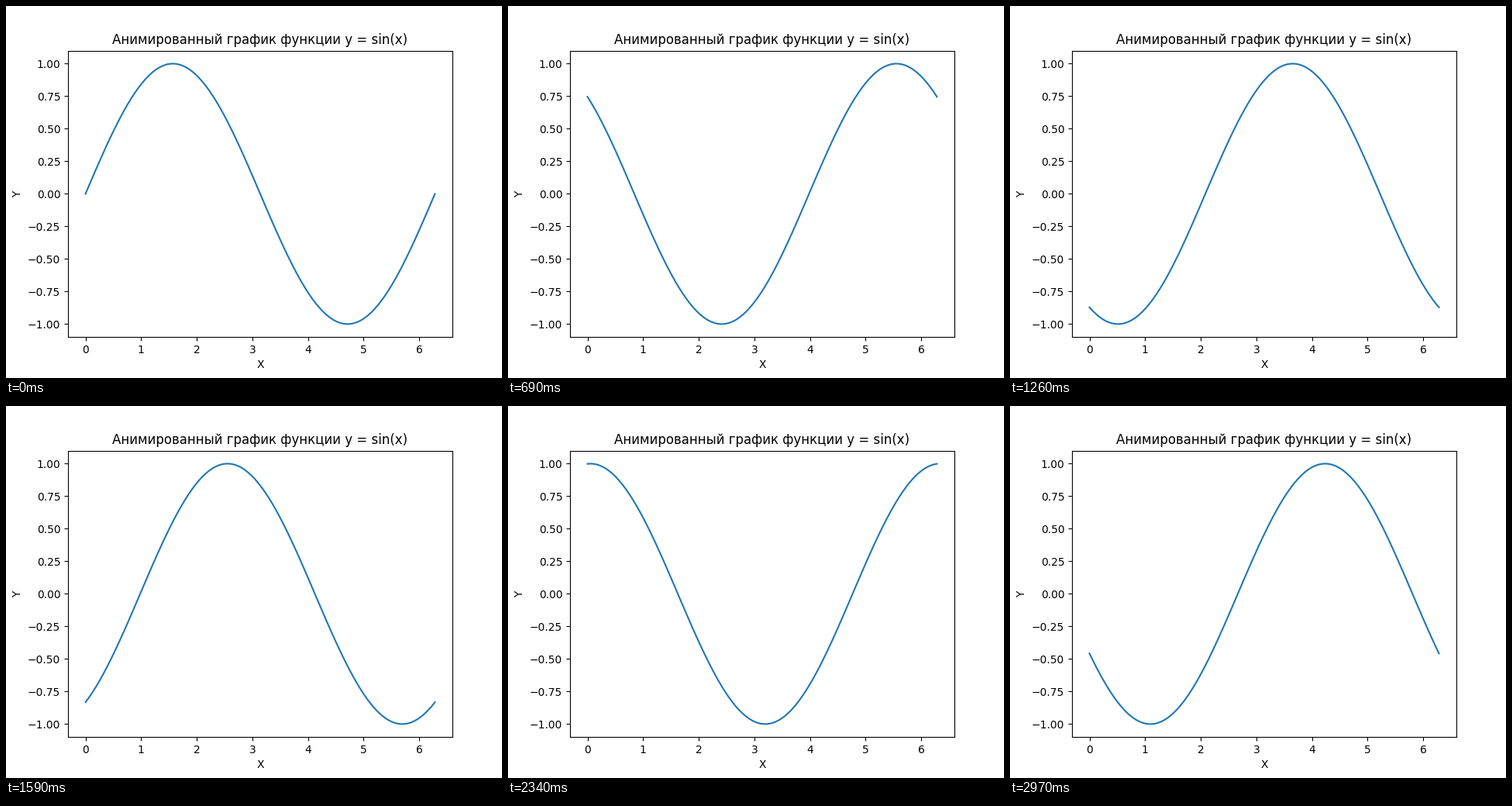
These frames come from a looping animation (640x480 px, 3 s). A matplotlib script:

```python
import numpy as np
import matplotlib.pyplot as plt
from matplotlib.animation import FuncAnimation

FRAMES = 100
INTERVAL = 30  # ms
PHASE_STEP = 0.1  # radians per frame

plt.rcParams["font.family"] = "DejaVu Sans"

x = np.linspace(0, 2 * np.pi, 100)

fig, ax = plt.subplots(figsize=(6.4, 4.8), dpi=100)
line, = ax.plot(x, np.sin(x))
ax.set_title("Анимированный график функции y = sin(x)")
ax.set_xlabel("X")
ax.set_ylabel("Y")


def update(frame):
    line.set_ydata(np.sin(x + PHASE_STEP * frame))
    return line,


anim = FuncAnimation(fig, update, frames=FRAMES, interval=INTERVAL,
                     repeat=True, repeat_delay=0, blit=False)

plt.show()
```
